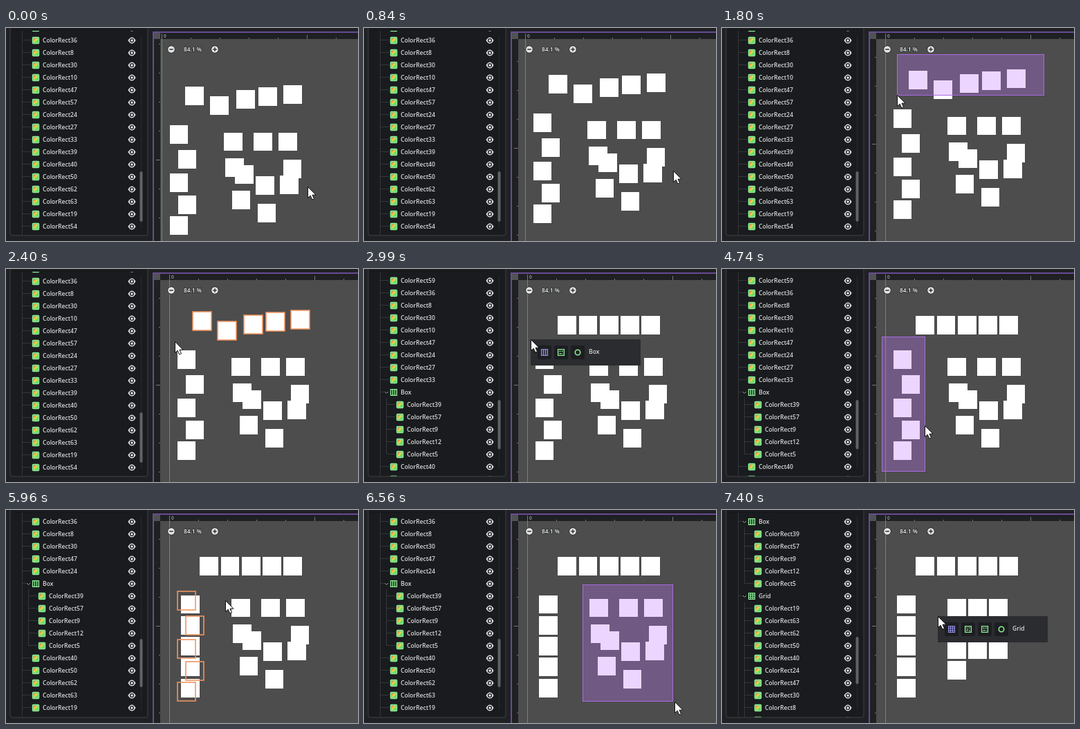
An HTML page that plays this animation: 509x309 px, repeating every 8 s.

```html
<!DOCTYPE html>
<html lang="en">
<head>
<meta charset="utf-8">
<title>Layout editor</title>
<style>
html, body { margin: 0; width: 100%; height: 100%; overflow: hidden; background: #1f2124; }
svg { display: block; width: 509px; height: 309px; }
text { font: 600 8.6px "Open Sans", "Noto Sans", sans-serif; fill: #d8d9da; }
.guide { stroke: #34373b; fill: none; }
.tick { stroke: #77797c; fill: none; }
.green { stroke: #8eef97; fill: none; }
.lilac { stroke: #8c8bdc; fill: none; }
.zoom { font-size: 8.3px; stroke: #26282a; stroke-width: 1.5; paint-order: stroke; fill: #f4f4f4; }
#outlines rect { fill: none; stroke: #f09560; stroke-width: 1.6; }
</style>
</head>
<body>
<svg viewBox="0 0 509 309">
  <defs>
    <linearGradient id="hue" x2="1" y2="1">
      <stop offset=".1" stop-color="#ff5a45"/>
      <stop offset=".45" stop-color="#f2d840"/>
      <stop offset=".8" stop-color="#45e058"/>
    </linearGradient>
    <clipPath id="treeClip"><rect x="8" y="4" width="194" height="296.5"/></clipPath>
    <clipPath id="viewClip"><rect x="223" y="16" width="286" height="293"/></clipPath>
    <clipPath id="topClip"><rect x="223" y="8" width="286" height="8"/></clipPath>
    <clipPath id="sideClip"><rect x="214" y="16" width="9" height="293"/></clipPath>
    <g id="leaf">
      <rect x="-4.5" y="-4.5" width="9" height="9" rx="1" fill="#22402a" stroke="#8eef97" stroke-width="1.5"/>
      <rect x="-3.2" y="-3.2" width="6.4" height="6.4" fill="url(#hue)"/>
    </g>
    <path id="box" stroke-width="1.4" d="M-4.4 -4.4h8.8v8.8h-8.8zM-1.5 -4v8M1.5 -4v8"/>
    <path id="grid" stroke-width="1.2" d="M-4.4 -4.4h8.8v8.8h-8.8zM-1.5 -4v8M1.5 -4v8M-4 -1.5h8M-4 1.5h8"/>
    <path id="flow" stroke-width="1.3" d="M-4.4 -4.4h8.8v8.8h-8.8zM-2.5 -1.6h2M.8 -1.6h1.8M-2.5 1.6h3M1.6 1.6h1"/>
    <path id="mesh" stroke-width="1.3" d="M-4.4 -4.4h8.8v8.8h-8.8zM-2.4 2.2l2 -2M.6 -1.8h1.8M-2.4 -1.8h1.5M1 2h1.5"/>
    <circle id="ring" r="3.7" stroke-width="1.6"/>
    <g id="eye">
      <path d="M-5.5 0Q-3 -4.6 0 -4.6T5.5 0Q3 4.6 0 4.6T-5.5 0" fill="#e2e3e4"/>
      <circle r="2.4" fill="#e2e3e4" stroke="#191b1e" stroke-width="1.4"/>
    </g>
  </defs>

  <path fill="#191b1e" stroke="#2d2f33" stroke-width="2" d="M6 -4V297q0 4 4 4H201q4 0 4 -4V-4z"/>
  <path d="M8 3.5H178" stroke="#141618"/>
  <g id="tree" clip-path="url(#treeClip)"></g>
  <path d="M195.5 10V290" stroke="#26292c"/>
  <rect id="thumb" x="193.5" width="4" rx="2" fill="#606265"/>

  <rect x="223" y="16" width="286" height="293" fill="#4d4d4d"/>
  <path d="M214 7H509V16H223V309H214z" fill="#1e2023"/>
  <g clip-path="url(#topClip)"><g id="topRule"></g></g>
  <g clip-path="url(#sideClip)"><g id="sideRule"></g></g>
  <path d="M213 309V6H509" fill="none" stroke="#694b93" stroke-width="2"/>
  <rect x="214" y="7" width="9" height="9" fill="#505256"/>

  <g clip-path="url(#viewClip)">
    <path id="axis" d="M225.5 0V309" stroke="#66906a"/>
    <g id="squares" fill="#fff"></g>
    <g id="outlines"></g>
    <rect id="marquee" fill="rgba(191,118,255,.3)" stroke="#a86be0"/>
  </g>

  <g fill="#e4e4e4" stroke="#2c2d2f">
    <circle cx="239" cy="31" r="5.3"/><circle cx="302" cy="31" r="5.3"/>
  </g>
  <path d="M236.3 31h5.4M299.3 31h5.4M302 28.3v5.4" stroke="#303234" stroke-width="1.5"/>
  <text class="zoom" x="257" y="33.7">84.1 %</text>
  <g id="popups"></g>
  <path id="cursor" d="M.5 .5V16.5L4.2 13.2L6.8 19L9.5 17.8L7 12.2H12z" fill="#fff" stroke="#111" stroke-linejoin="round"/>
</svg>

<script>
const LOOP = 8000, ZOOM = .841, SIZE = 32 * ZOOM, GAP = 36 * ZOOM, ROW = 18;
const $ = id => document.getElementById(id);
const show = (el, on) => el.style.display = on ? '' : 'none';
const move = (el, x, y) => el.setAttribute('transform', `translate(${x} ${y})`);
const setAttrs = (el, attrs) => { for (const k in attrs) el.setAttribute(k, attrs[k]); };
const icon = (id, x, y, cls = '') => `<use href="#${id}" x="${x}" y="${y}" class="${cls}"/>`;
const label = (s, x, y) => `<text x="${x}" y="${y + 3.2}">${s}</text>`;
const ease = k => k * k * (3 - 2 * k);

// Each stage: drag a band, select, wrap the squares in a container, confirm in a popup
const stages = [
  { at: [[270,62],[306,76],[344,67],[376,63],[412,60]],
    snap: i => [280.3 + GAP * i, 68],
    press: 1320, release: 2160, select: 2280, wrap: 2760, popup: 2990, close: 3610, clear: 2990,
    name: 'Box', icons: ['box', 'flow', 'ring'] },
  { at: Array.from({ length: 5 }, (_, i) => [247.5 + 12 * (i % 2), 118 + 36.6 * i - .9 * i * i]),
    snap: i => [253, 123.5 + GAP * i],
    press: 4020, release: 4620, select: 4860, wrap: 5220, popup: 5220, close: 5590, clear: 6080,
    name: 'Box', icons: ['box', 'flow', 'ring'] },
  { at: [[326,128.5],[369,128.5],[405,128.5],[328,166],[342,176],[372,192],[411.5,168],[407,191],[337.5,213],[374.5,232]],
    snap: i => [325.8 + GAP * (i % 3), 128.5 + GAP * Math.floor(i / 3)],
    press: 6080, release: 6440, select: 6680, wrap: 7160, popup: 7280, close: LOOP, clear: 7160,
    name: 'Grid', icons: ['grid', 'mesh', 'flow', 'ring'] }
];

// Pointer key points: time, x, y
const path = [
  [0,436,230],[220,439,224],[600,439,224],[960,450,201],[1320,465,38],[1800,253,97],
  [2160,245,107],[2760,241,102],[3610,241,102],[4020,231,98],[4620,293,293],[4740,293,227],
  [5220,255,150],[5590,255,150],[5960,317,131],[6080,316,108],[6440,446,277],[6560,449,278],[7160,312,154]
];

function pointer(t) {
  const i = path.findIndex(p => p[0] > t);
  if (i < 0) return path.at(-1).slice(1);
  const [t0, x0, y0] = path[i - 1], [t1, x1, y1] = path[i];
  const k = ease((t - t0) / (t1 - t0));
  return [Math.round(x0 + (x1 - x0) * k), Math.round(y0 + (y1 - y0) * k)];
}

function tick(t) {
  const phase = t < 2990 ? 0 : t < 5590 ? 60 : 80;
  return Math.max(0, Math.floor((t - phase) / 120) * 120 + phase);
}

// Edges snap to whole pixels
function square([x, y]) {
  const l = Math.round(x), t = Math.round(y);
  return { x: l, y: t, width: Math.round(x + SIZE) - l, height: Math.round(y + SIZE) - t };
}

// The node list before and after each wrap
function treeStates() {
  const ids = s => s.split(' ');
  const all = ids('59 36 8 30 10 47 57 24 27 33 39 40 50 62 63 19 54');
  const boxed = ids('39 57 9 12 5'), column = ids('59 10 27 33 54');
  const box = { name: 'Box', nodes: boxed };
  const first = all.map(n => n === boxed[0] ? box : n).filter(n => !boxed.includes(n));
  const second = first.filter(n => !column.includes(n));
  const rest = second.filter(n => n !== box).reverse();
  return [all, first, second, [box, { name: 'Grid', nodes: rest }]];
}

function treeMarkup(nodes, y) {
  let out = '<path class="guide" d="M23.5 0V301"/>';
  const row = (name, kind, dx) => {
    out += `<path class="guide" d="M${24 + dx} ${y - .5}h${kind === 'leaf' ? 12 : 5}"/>`
      + icon(kind, 43 + dx, y, 'green') + label(name, 53 + dx, y) + icon('eye', 182, y);
    y += ROW;
  };
  for (const node of nodes) {
    if (!node.nodes) { row('ColorRect' + node, 'leaf', 0); continue; }
    out += `<path d="M30 ${y - 1}l2.5 2.5l2.5 -2.5" fill="none" stroke="#a0a2a4"/>`
      + `<path class="guide" d="M32.5 ${y + 8}v${ROW * node.nodes.length - 8}"/>`;
    row(node.name, node.name.toLowerCase(), 0);
    node.nodes.forEach(n => row('ColorRect' + n, 'leaf', 9));
  }
  return `<g>${out}</g>`;
}

function popupMarkup({ popup, name, icons }) {
  const buttons = icons.map((id, i) =>
    `<rect x="${10 + 24 * i}" y="9" width="20" height="20" rx="2" fill="#1d1e21"/>`
    + icon(id, 20 + 24 * i, 19, i ? 'green' : 'lilac')).join('');
  return `<g transform="translate(${pointer(popup)})"><rect width="159" height="38" fill="#2b2c2f"/>`
    + buttons + label(name, 12 + 24 * icons.length, 18) + '</g>';
}

function build() {
  const sets = stages.map(s => `<g>${'<rect/>'.repeat(s.at.length)}</g>`).join('');
  for (const id of ['squares', 'outlines']) {
    $(id).innerHTML = sets;
    stages.forEach((s, n) => s.at.forEach((p, i) => setAttrs($(id).children[n].children[i], square(p))));
  }
  $('tree').innerHTML = treeStates().map((nodes, i) => treeMarkup(nodes, i ? 17 : 0)).join('');
  $('popups').innerHTML = stages.map(popupMarkup).join('');
  let top = '', side = '';
  for (let i = -1; i < 9; i++) {
    const len = i === 0 ? 8 : i === 5 ? 6 : 2;
    top += `M${225.5 + 42 * i} 16v${-len}`;
    side += `M223 ${-18.5 + 42 * i}h${-len}`;
  }
  $('topRule').innerHTML = `<path class="tick" d="${top}"/><text x="228" y="14.2" style="font-size:6.5px;fill:#a5a7a9">0</text>`;
  $('sideRule').innerHTML = `<path class="tick" d="${side}"/>`;
}

function draw(now) {
  const t = now % LOOP, q = tick(t);
  const during = (from, to) => t >= from && t < to;
  move($('cursor'), ...pointer(q));

  const pan = Math.min(1, Math.max(0, (q - 480) / 480));
  const px = Math.round(11 * pan), py = Math.round(-23 * pan);
  move($('topRule'), px, 0);
  move($('sideRule'), 0, py);
  move($('axis'), px, 0);
  move($('squares'), px - 11, py + 23);

  stages.forEach((s, n) => {
    [...$('squares').children[n].children].forEach((el, i) =>
      setAttrs(el, square(t >= s.popup ? s.snap(i) : s.at[i])));
    show($('outlines').children[n], during(s.select, s.clear));
    show($('popups').children[n], during(s.popup, s.close));
  });

  const drag = stages.find(s => during(s.press, s.select));
  show($('marquee'), drag);
  if (drag) {
    const [ax, ay] = pointer(drag.press), [bx, by] = pointer(Math.min(q, drag.release));
    setAttrs($('marquee'), {
      x: Math.min(ax, bx) + .5, y: Math.min(ay, by) + .5,
      width: Math.abs(bx - ax), height: Math.abs(by - ay)
    });
  }

  const wraps = stages.filter(s => t >= s.wrap).length;
  [...$('tree').children].forEach((el, i) => show(el, i === wraps));
  setAttrs($('thumb'), { y: wraps ? 193 - 3 * wraps : 208, height: 73 - 1.5 * wraps });
}

build();
const start = performance.now();
(function frame() {
  draw(performance.now() - start);
  requestAnimationFrame(frame);
})();
</script>
</body>
</html>
```
